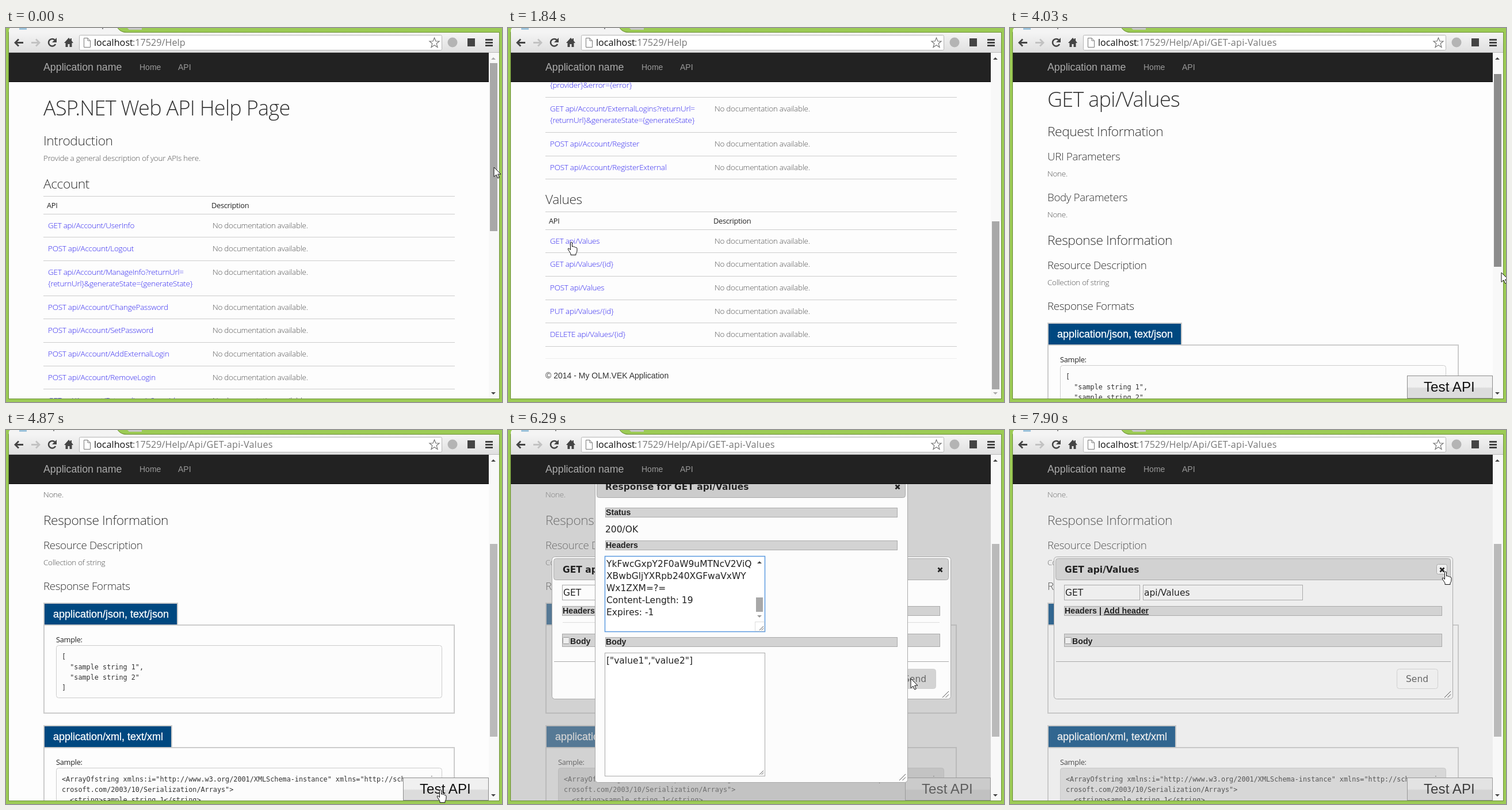
Write an HTML page that moves like this. It is 862 px wide and 650 px high and loops after 8000 ms.

```html
<!DOCTYPE html>
<html lang="en">
<head>
<meta charset="utf-8">
<title>API help page</title>
<style>
html, body { margin: 0; width: 100%; height: 100%; overflow: hidden; background: #9ccb55; }
svg { display: block; }
text { white-space: pre; }
.h1, .h2, .h3, .p, .link { font-family: "Open Sans", "Noto Sans", sans-serif; font-weight: 300; letter-spacing: -.02em; fill: #333; }
.h1 { font-size: 36px; }
.h2 { font-size: 22.8px; }
.h3 { font-size: 18.8px; }
.p, .link { font-size: 13.5px; }
.p { fill: #555; }
.link { fill: #3328f0; }
.th { font: 12.8px "Open Sans", sans-serif; letter-spacing: -.022em; fill: #222; }
.url { font: 16.2px "Open Sans", sans-serif; fill: #777; }
.arial { font: 14px "Liberation Sans", Arial, sans-serif; }
.brand { font-size: 17.8px; }
.tab { font-size: 18px; fill: #fff; stroke: #fff; stroke-width: .3px; }
.test { font-size: 24.2px; fill: #111; }
.label { font: bold 14.2px "Liberation Sans", Arial, sans-serif; fill: #222; }
.code { font: 11.8px "DejaVu Sans Mono", monospace; fill: #333; }
.ui { font: 15.5px "DejaVu Sans", sans-serif; fill: #222; }
.bold { font-weight: bold; }
#sub { letter-spacing: .016em; }
</style>
</head>
<body>
<svg id="stage" width="862" height="650" viewBox="0 0 862 650"></svg>
<script>
const esc = s => s.replace(/&/g, '&amp;').replace(/</g, '&lt;');
const text = (x, y, cls, s, more = '') => `<text x="${x}" y="${y}" class="${cls}" ${more}>${esc(s)}</text>`;
const rect = (x, y, w, h, fill, more = '') => `<rect x="${x}" y="${y}" width="${w}" height="${h}" fill="${fill}" ${more}/>`;
// Rectangle with a crisp 1px border inside the given edges
const box = (x, y, x2, y2, fill, line = '#aaa', more = '') =>
  rect(x + .5, y + .5, x2 - x - 1, y2 - y - 1, fill, `stroke="${line}" ${more}`);
const path = (d, color, width = 1, more = '') => `<path d="${d}" fill="none" stroke="${color}" stroke-width="${width}" ${more}/>`;
const fillPath = (d, color, more = '') => `<path d="${d}" fill="${color}" ${more}/>`;
const group = (id, body) => `<g id="${id}">${body}</g>`;

function table(y, title, rows) {
  let s = text(65, y - 13, 'h2', title) + rect(65, y, 715, 1, '#ccc') +
    text(71, y + 21, 'th', 'API') + text(357, y + 21, 'th', 'Description');
  y += 30.5;
  for (const row of rows) {
    const lines = row.split('\n'), top = Math.round(y);
    s += rect(65, top, 715, 1, '#ccc') + text(359, top + 25, 'p', 'No documentation available.');
    lines.forEach((l, i) => s += text(73, top + 25 + 20 * i, 'link', l));
    y += 40.7 + 20 * (lines.length - 1);
  }
  return s + rect(65, Math.round(y), 715, 1, '#ccc');
}

function sample(y, x2, height, title, code) {
  return rect(66, y + 38, 713, height, 'none', 'stroke="#ccc" stroke-width="2"') +
    rect(65, y - 1, x2 - 64, 38, '#ccc') + rect(67, y + 1, x2 - 68, 36, '#004880') +
    text(82, y + 25, 'arial tab', title) + text(87, y + 68, 'th', 'Sample:') +
    box(87, y + 73, 758, y + height + 12, '#fcfcfc', '#ccc', 'rx="4" class="pre"') +
    code.map((l, i) => text(97, y + 97 + 18 * i, 'code', l)).join('');
}

const account = ['GET UserInfo', 'POST Logout', 'GET ManageInfo?returnUrl=\n{returnUrl}&generateState={generateState}',
  'POST ChangePassword', 'POST SetPassword', 'POST AddExternalLogin', 'POST RemoveLogin',
  'GET ExternalLogin?provider=\n{provider}&error={error}',
  'GET ExternalLogins?returnUrl=\n{returnUrl}&generateState={generateState}', 'POST Register', 'POST RegisterExternal'
].map(s => s.replace(' ', ' api/Account/'));
const values = ['GET api/Values', 'GET api/Values/{id}', 'POST api/Values', 'PUT api/Values/{id}', 'DELETE api/Values/{id}'];

const listPage = text(65, 152, 'h1', 'ASP.NET Web API Help Page') + text(65, 204, 'h2', 'Introduction') +
  text(65, 231, 'p', 'Provide a general description of your APIs here.') +
  table(292, 'Account', account) + table(887, 'Values', values) + rect(65, 1142, 715, 1, '#eee') +
  text(65, 1177, 'arial', '© 2014 - My OLM.VEK Application', 'fill="#333"');

const detailPage = [
  [108, 'link', 'Help Page Home'], [172, 'h1', 'GET api/Values'], [223, 'h2', 'Request Information'],
  [265, 'h3', 'URI Parameters'], [293, 'p', 'None.'], [336, 'h3', 'Body Parameters'], [364, 'p', 'None.'],
  [412, 'h2', 'Response Information'], [454, 'h3', 'Resource Description'], [482, 'p', 'Collection of string'],
  [525, 'h3', 'Response Formats']].map(([y, c, s]) => text(65, y, c, s)).join('') +
  sample(548, 298, 153, 'application/json, text/json', ['[', '  "sample string 1",', '  "sample string 2"', ']']) +
  sample(761, 288, 190, 'application/xml, text/xml', [
    '<ArrayOfstring xmlns:i="http://www.w3.org/2001/XMLSchema-instance" xmlns="http://schemas.mi',
    'crosoft.com/2003/10/Serialization/Arrays">', '  <string>sample string 1</string>',
    '  <string>sample string 2</string>', '</ArrayOfstring>']);

const button = box(690, 604, 839, 644, 'url(#silver)', '#8c8c8c') + text(719, 632, 'arial test', 'Test API');
const close = (x, y) => path(`M${x - 3.5} ${y - 3.5}l7 7m0-7l-7 7`, '#222', 2.8);
const grip = (x, y, n) => path(`M${x - n} ${y}l${n}-${n}M${x - n / 2} ${y}l${n / 2}-${n / 2}`, '#555');
const bar = (x, y, x2, y2) => box(x, y, x2, y2, '#d3d3d3');

const request = box(76, 220, 770, 468, '#fcfcfc', '#aaa', 'rx="5" id="panel"') +
  box(79, 223, 766, 261, '#d2d2d2', '#aaa', 'rx="4"') + text(95, 248, 'ui bold', 'GET api/Values') +
  box(741, 233, 760, 251, '#eee', '#aaa', 'rx="3" id="hover"') + close(751, 243) +
  box(94, 269, 226, 296, 'none') + box(231, 269, 509, 296, 'none') +
  text(96, 288, 'ui', 'GET') + text(233, 288, 'ui', 'api/Values') +
  bar(94, 306, 751, 323) + text(95, 319, 'label', 'Headers | ') +
  text(163, 319, 'label', 'Add header', 'text-decoration="underline"') +
  rect(95, 334, 655, 1, '#ddd', 'id="rule"') + bar(94, 354, 751, 377) +
  box(95, 360, 107, 372, '#eee', '#999', 'rx="1"') + text(108, 372, 'label', 'Body') +
  rect(80, 402, 686, 1, '#aaa') + box(672, 415, 744, 450, '#eee', '#d0d0d0', 'rx="4" id="send"') +
  text(688, 438, 'ui', 'Send', 'style="fill:#666"') + grip(766, 465, 11);

const headers = ['YkFwcGxpY2F0aW9uMTNcV2ViQ', 'XBwbGljYXRpb240XGFwaVxWY', 'Wx1ZXM=?=', 'Content-Length: 19', 'Expires: -1'];
const response = box(151, 60, 695, 613, '#fcfcfc', '#aaa', 'rx="5"') + box(154, 70, 691, 118, '#ccc', '#aaa', 'rx="4"') +
  text(169, 104, 'ui bold', 'Response for GET api/Values') + close(677, 99) +
  bar(169, 135, 677, 152) + text(170, 148, 'label', 'Status') + text(169, 178, 'ui', '200/OK') +
  bar(169, 192, 677, 209) + text(170, 205, 'label', 'Headers') +
  box(168, 219, 447, 351, '#fff', '#5b9ae0', 'stroke-width="1.5"') +
  headers.map((l, i) => text(171, 238 + 21 * i, 'ui', l)).join('') +
  fillPath('M433 232h8l-4-4z', '#444') + rect(431, 291, 12, 25, '#a8a8a8') + fillPath('M433 322h8l-4 4z', '#999') +
  box(429, 333, 446, 350, '#fff', '#ddd') + grip(444, 348, 7) +
  bar(169, 360, 677, 377) + text(170, 373, 'label', 'Body') + box(168, 387, 447, 602, '#fff') +
  text(171, 406, 'ui', '["value1","value2"]') + grip(444, 599, 7) + grip(691, 609, 11);

const frame = rect(0, 0, 862, 8, '#9ccb55') + rect(0, 0, 5, 650, '#9ccb55') + rect(857, 0, 5, 650, '#9ccb55') +
  rect(0, 644, 862, 6, '#9ccb55') + rect(5, 8, 852, 35, 'url(#bar)') + box(4, 7, 858, 645, 'none', '#6d9038') +
  fillPath('M5 9V3Q6 1 7 0H194Q199 8 209 8V9Z', '#f4f4f4') + path('M194 0Q199 7 209 7.5', '#6d9038') +
  fillPath('M211 0L214 3H236V0Z', '#c9c9c9') + rect(23, 0, 13, 3, '#9cc3dc') + rect(82, 0, 2, 2, '#888', 'id="title"') +
  rect(5, 42, 852, 1, '#bbb') +
  path('M30 25.500H17M22 19.500l-6 6 6 6', '#444', 2.8) + path('M44 25.500H57M52 19.500l6 6-6 6', '#c2c2c2', 2.8) +
  path('M85 21A6.300 6.300 0 1 0 86 28', '#444', 2.6) + fillPath('M88 17V25H80Z', '#444') +
  fillPath('M101 26L109 17 112 20V18H114V22L117 26H114.500V33H110.500V28H107.500V33H103.500V26Z', '#444') +
  box(127, 12, 758, 39, '#fff', '#b5b5b5', 'rx="2"') + path('M135.500 17.500H142L146.500 22V33.500H135.500ZM142 17.500V22H146.500', '#777') +
  text(153, 31, 'url', 'localhost', 'style="fill:#111"') + text(220, 31, 'url', ':17529/Help') +
  text(311, 31, 'url', '/Api/GET-api-Values', 'id="sub"') +
  path('M744.500 17l2.500 6h6l-4.800 4 1.800 6.500-5.500-3.800-5.500 3.800 1.800-6.500-4.800-4h6Z', '#777', 1.2) +
  '<circle cx="776" cy="25" r="8.5" fill="#b4b4b4"/>' + rect(802, 18, 13, 14, '#444') +
  [19, 24, 29].map(y => rect(833, y, 13, 3, '#444')).join('') +
  rect(5, 43, 834, 51, '#222') + rect(5, 93, 834, 1, '#080808') +
  text(65, 74, 'arial brand', 'Application name', 'fill="#aaa"') +
  text(232, 73, 'arial', 'Home', 'fill="#999"') + text(299, 73, 'arial', 'API', 'fill="#999"') +
  rect(839, 43, 18, 601, '#f8f8f8') + fillPath('M843 55h8l-4-4z', '#444', 'id="up"') +
  fillPath('M843 633h8l-4 4z', '#444', 'id="down"') + rect(841, 61, 13, 292, '#aaa', 'id="thumb"');

const arrow = 'M0 0V16.500L4 13 6.700 19 9.300 18 6.700 12H12Z';
const hand = 'M-1.500 1Q0-1 1.500 1V8Q3 6.500 4.500 8.500 6 7.200 7.300 9.500 9.500 8.800 10 11V15Q10 18 8 20V22.500H-1V20L-5.500 13Q-6.500 10.500-4 11L-1.500 13.500Z';

const stage = document.getElementById('stage');
const gradient = (id, a, b) => `<linearGradient id="${id}" x2="0" y2="1"><stop offset=".5" stop-color="${a}"/><stop offset=".55" stop-color="${b}"/></linearGradient>`;
stage.innerHTML = gradient('silver', '#f0f0f0', '#dcdcdc') +
  '<linearGradient id="bar" x2="0" y2="1"><stop stop-color="#f4f4f4"/><stop offset="1" stop-color="#dfdfdf"/></linearGradient>' +
  rect(0, 0, 862, 650, '#fdfdfd') + group('list', listPage) + group('detail', detailPage) + group('test', button) +
  rect(5, 94, 834, 550, '#000', 'id="shade"') + group('request', request) + group('response', response) + frame +
  group('cursor', fillPath(arrow, '#fff', 'id="arrow" stroke="#111"') + fillPath(hand, '#fff', 'id="hand" stroke="#111"'));

const el = {};
stage.querySelectorAll('[id]').forEach(e => el[e.id] = e);
const show = (name, on) => el[name].style.display = on ? '' : 'none';
const set = (name, attr, v) => el[name].setAttribute(attr, v);

// Eased value at time t along [time, a, b...] stops
function along(stops, t) {
  const i = stops.findIndex(s => s[0] > t);
  if (i < 0) return stops[stops.length - 1].slice(1);
  if (!i) return stops[0].slice(1);
  const p = stops[i - 1], q = stops[i], u = (t - p[0]) / (q[0] - p[0]), k = u * u * (3 - 2 * u);
  return p.slice(1).map((v, j) => v + (q[j + 1] - v) * k);
}

const pointer = [[120, 848, 242], [800, 842, 549], [1000, 842, 549], [1750, 110, 372], [2140, 110, 372],
  [2680, 846, 355], [2760, 846, 355], [3250, 765, 622], [3400, 765, 622], [3850, 853, 390], [4030, 854, 425],
  [4330, 854, 528], [4420, 854, 528], [4840, 755, 625], [5270, 755, 625], [5800, 700, 432], [6690, 700, 432],
  [7020, 677, 98], [7120, 677, 98], [7630, 757, 241], [7780, 757, 241], [7890, 757, 246]];
const listScroll = [[120, 0], [800, 568]];
const detailScroll = [[3900, 0], [4030, 35], [4330, 247]];
const NAVIGATE = 2050, OPEN = 5270, REPLY = 6050, CLOSE = 7100, TRACK = 567, VIEW = 601;

function draw(t) {
  const detail = t >= NAVIGATE, asked = t >= OPEN, replied = t >= REPLY && t < CLOSE, closed = t >= CLOSE;
  const [scroll] = along(detail ? detailScroll : listScroll, t);
  const max = detail ? 417 : 568, size = TRACK * VIEW / (VIEW + max);
  const [x, y] = along(pointer, t);

  show('list', !detail);
  for (const name of ['detail', 'test', 'sub']) show(name, detail);
  set(detail ? 'detail' : 'list', 'transform', `translate(0 ${-Math.round(scroll)})`);
  set('title', 'x', detail ? 82 : 167);
  set('thumb', 'y', Math.round(60.5 + (TRACK - size) * scroll / max));
  set('thumb', 'height', Math.round(size));
  set('thumb', 'fill', !detail ? '#a8a8a8' : t > 3850 && t < 4420 ? '#8c8c8c' : '#bababa');
  set('up', 'fill', scroll > 0 ? '#444' : '#aaa');
  set('down', 'fill', scroll < max ? '#444' : '#aaa');

  show('shade', asked);
  show('request', asked);
  show('response', replied);
  set('shade', 'fill', replied ? 'rgba(170,170,170,.51)' : 'rgba(188,188,188,.26)');
  stage.querySelectorAll('.pre').forEach(e => e.setAttribute('fill', asked ? '#dfdfdf' : '#fcfcfc'));
  set('panel', 'fill', closed ? '#eee' : '#fcfcfc');
  show('rule', !closed);
  set('send', 'fill', t > 5720 && !closed ? '#d3d3d3' : '#eee');
  show('hover', t > 7600);

  const onLink = !detail && x < 161 && y < 380;
  const onButton = detail && !asked && x > 690 && x < 839 && y > 604;
  const pointing = onLink || onButton || t > 7600 || (replied && y < 108);
  show('hand', pointing);
  show('arrow', !pointing);
  set('cursor', 'transform', `translate(${Math.round(x)} ${Math.round(y)})`);
}

const start = performance.now();
function tick() {
  draw((performance.now() - start) % 8000);
  requestAnimationFrame(tick);
}
tick();
</script>
</body>
</html>
```
